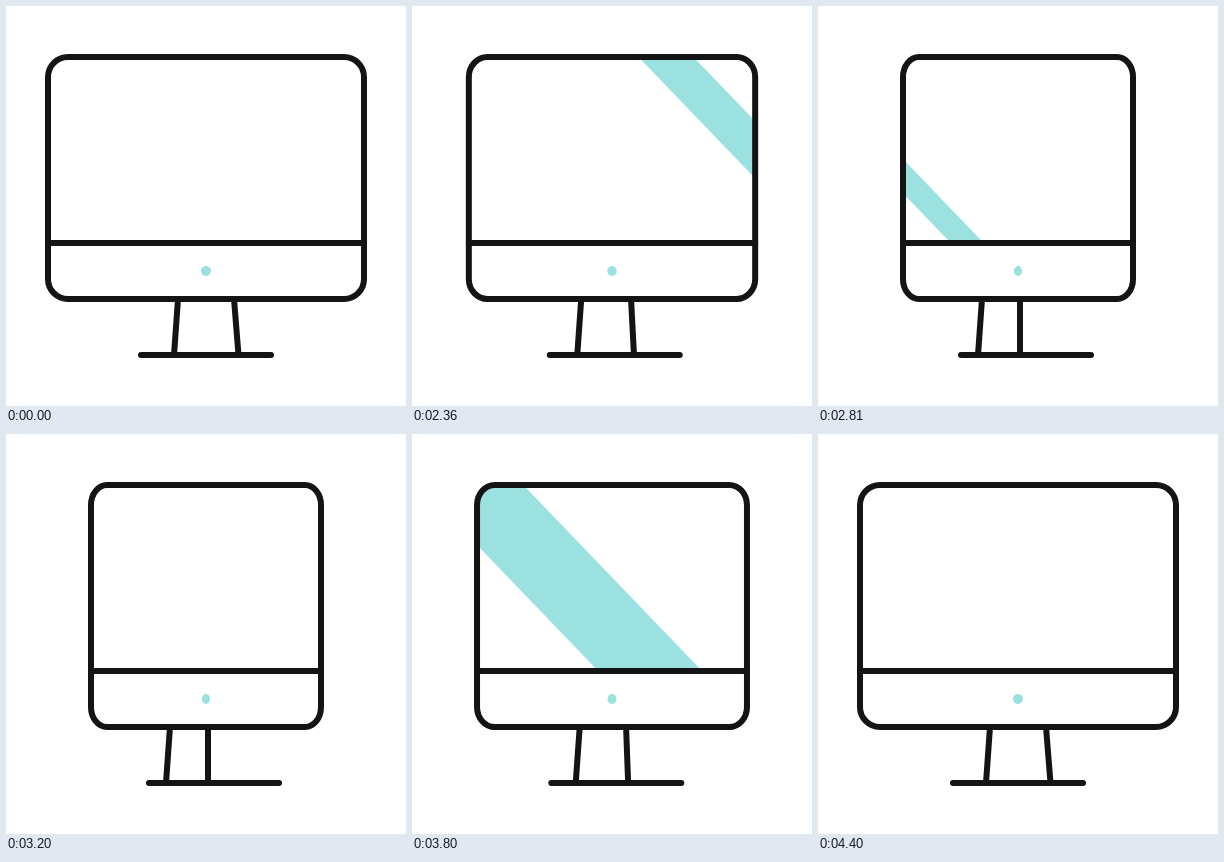
These frames come from a looping animation (400x400 px, 4.43 s). An HTML page with a canvas:

```html
<!DOCTYPE html>
<html lang="en">
<head>
<meta charset="utf-8">
<title>Turning monitor</title>
<style>
  html, body { margin: 0; width: 100%; height: 100%; overflow: hidden; background: #fff; }
  canvas { display: block; }
</style>
</head>
<body>
<canvas id="stage" width="400" height="400"></canvas>
<script>
const LOOP = 4430, STEP = 30, START = 2030;
const INK = '#131416', TEAL = '#9be1df';
const TOP = 51, DIVIDER = 237, BOTTOM = 293, FLOOR = 349;
const SLOPE = 1.04;
const ctx = document.getElementById('stage').getContext('2d');

const ramp = (t, from, to) => Math.min(1, Math.max(0, (t - from) / (to - from)));
const ease = u => u < 0.5 ? 4 * u ** 3 : 1 - 4 * (1 - u) ** 3;
const mix = (a, b, u) => a + (b - a) * u;

// 0 = facing the viewer, 1 = fully turned
const turnAt = t => ease(ramp(t, 2000, 2815)) - ease(ramp(t, 3200, LOOP));

function line(x1, y1, x2, y2) {
  ctx.beginPath();
  ctx.moveTo(x1, y1);
  ctx.lineTo(x2, y2);
  ctx.stroke();
}

function casing(half, radius) {
  ctx.beginPath();
  ctx.roundRect(200 - half, TOP, half * 2, BOTTOM - TOP, { x: radius, y: 20 });
}

// Slanted band whose top edge starts at x on the line y = 54
function band(x, width) {
  const dx = 200 / SLOPE, y = 44, left = x - 10 / SLOPE;
  ctx.beginPath();
  ctx.moveTo(left, y);
  ctx.lineTo(left + width, y);
  ctx.lineTo(left + width + dx, y + 200);
  ctx.lineTo(left + dx, y + 200);
  ctx.fill();
}

function reflections(t) {
  if (t >= 2000 && t < 3200) {
    const shift = -0.93 * (t - 2570);
    band(34 + shift, 55);
    band(180 + shift, 33);
  } else if (t >= 3200) {
    band(166 + 0.742 * (t - 4010), 104);
  }
}

function draw(t) {
  const turn = turnAt(t);
  const half = mix(158, 115, turn), radius = mix(20, 16, turn);

  ctx.clearRect(0, 0, 400, 400);
  ctx.fillStyle = TEAL;
  ctx.strokeStyle = INK;
  ctx.lineWidth = 6;
  ctx.lineCap = 'round';

  ctx.save();
  casing(half, radius);
  ctx.clip();
  ctx.beginPath();
  ctx.rect(0, 0, 400, DIVIDER);
  ctx.clip();
  reflections(t);
  ctx.restore();

  ctx.beginPath();
  ctx.ellipse(200, 265, mix(5, 4.1, turn), 5, 0, 0, Math.PI * 2);
  ctx.fill();

  casing(half, radius);
  ctx.stroke();
  line(200 - half, DIVIDER, 200 + half, DIVIDER);

  const near = -8 * turn;
  line(172 + near, BOTTOM, 168 + near, FLOOR);
  line(mix(228, 202, turn), BOTTOM, mix(232.5, 202, turn), FLOOR);
  line(135 - near, FLOOR, 265 - near, FLOOR);
}

function tick(now) {
  const t = now % LOOP;
  draw(START + Math.floor((t - START) / STEP) * STEP);
  requestAnimationFrame(tick);
}
requestAnimationFrame(tick);
</script>
</body>
</html>
```
